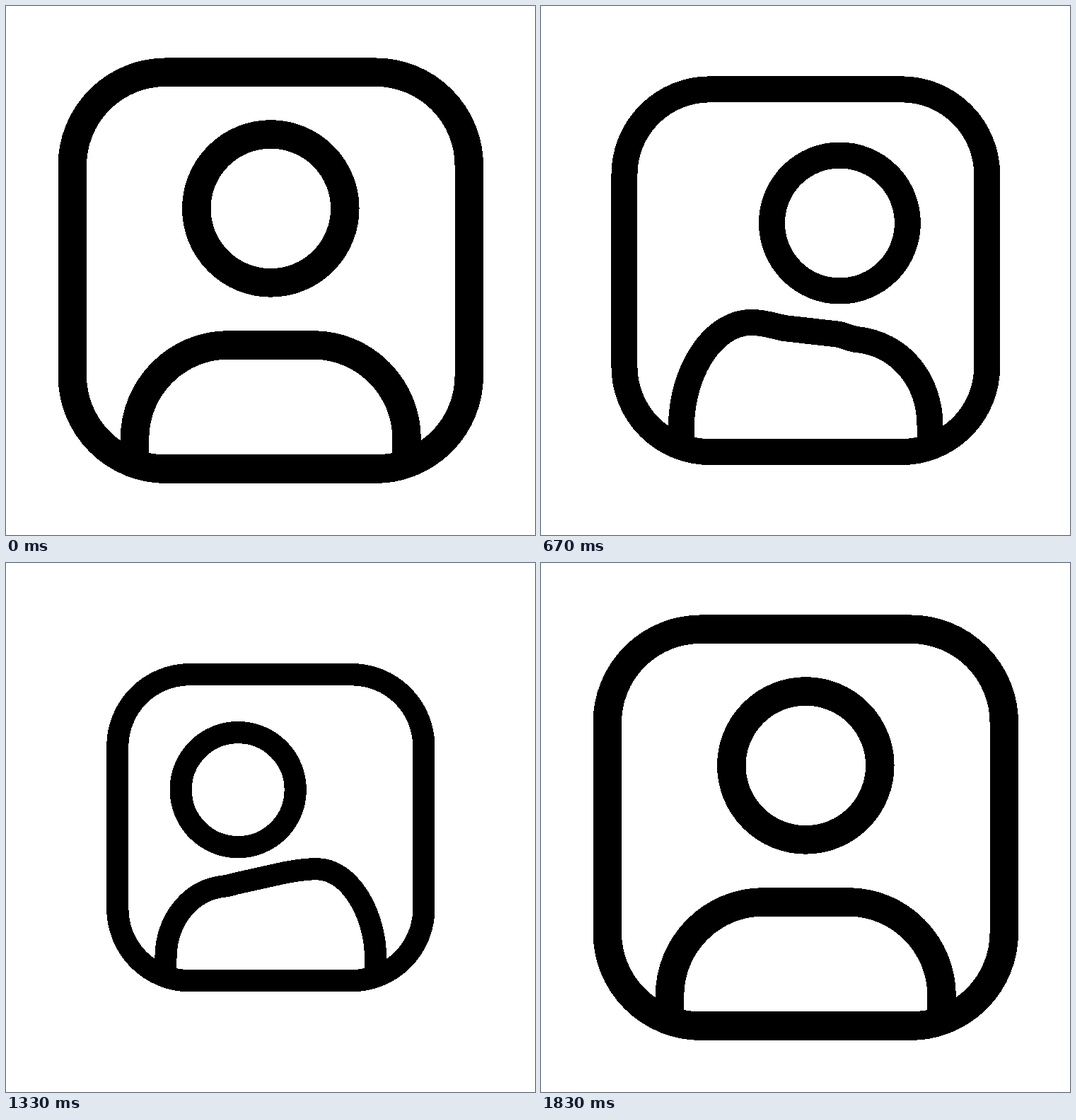
These frames come from a looping animation (748 px wide and 748 px high, 1.93 s). An HTML page without scripts:

```html
<!DOCTYPE html>
<html lang="en">
<head>
<meta charset="utf-8">
<title>Swaying profile icon</title>
<style>
  html, body { margin: 0; width: 100%; height: 100%; overflow: hidden; background: #fff; }
  svg { display: block; width: 100vw; height: 100vh; }
  .icon { fill: none; stroke: #000; stroke-width: 40.5; }
</style>
</head>
<body>
<!-- Phases: rest, lean right, lean left, return, rest -->
<svg viewBox="0 0 748 748" shape-rendering="crispEdges">
  <g transform="translate(374.3 374.2)">
    <g class="icon">
      <animateTransform attributeName="transform" type="scale" dur="1.93s" repeatCount="indefinite"
        calcMode="spline" keyTimes="0;.1865;.443;.7202;.9482;1"
        keySplines="0 0 1 1;.79 0 .195 1;.448 0 .198 1;.672 0 .1 1;0 0 1 1"
        values="1;1;.9;.771;1;1"/>

      <rect class="frame" x="-280.5" y="-280.5" width="561" height="561" rx="132"/>

      <circle class="head" cy="-87.8" r="105">
        <animateMotion dur="1.93s" repeatCount="indefinite"
          path="M0 0Q30.25 0 60.5 18.9Q0 -18.9 -60.5 18.9Q-30.25 0 0 0"
          calcMode="spline" keyTimes="0;.1865;.443;.7202;.9482;1"
          keySplines="0 0 1 1;.79 0 .195 1;.448 0 .198 1;.672 0 .1 1;0 0 1 1"
          keyPoints="0;0;.25;.75;1;1"/>
      </circle>

      <path class="shoulders" d="M-192.3 270V238C-192.3 165-133 105.2-60 105.2C-50 105.2-40 105.2-30 105.2L30 105.2C40 105.2 50 105.2 60 105.2C133 105.2 192.3 165 192.3 238V270">
        <animate attributeName="d" dur="1.93s" repeatCount="indefinite"
          calcMode="spline" keyTimes="0;.1865;.443;.7202;.9482;1"
          keySplines="0 0 1 1;.79 0 .195 1;.448 0 .198 1;.672 0 .1 1;0 0 1 1"
          values="M-192.3 270V238C-192.3 165-133 105.2-60 105.2C-50 105.2-40 105.2-30 105.2L30 105.2C40 105.2 50 105.2 60 105.2C133 105.2 192.3 165 192.3 238V270;
            M-192.3 270V238C-192.3 165-133 105.2-60 105.2C-50 105.2-40 105.2-30 105.2L30 105.2C40 105.2 50 105.2 60 105.2C133 105.2 192.3 165 192.3 238V270;
            M-192.3 270V241C-192.3 160-148 76-88 76C-65 76-50 83-33 86.5L51 97C62 98.5 68 104 80 106.5C150 114 192.3 172 192.3 241V270;
            M-192.3 270V241C-192.3 172-150 114-84 107.5C-74 106-70 104-62 102L27 82C45 79 62 75.5 84 75.5C146 75.5 192.3 160 192.3 241V270;
            M-192.3 270V238C-192.3 165-133 105.2-60 105.2C-50 105.2-40 105.2-30 105.2L30 105.2C40 105.2 50 105.2 60 105.2C133 105.2 192.3 165 192.3 238V270;
            M-192.3 270V238C-192.3 165-133 105.2-60 105.2C-50 105.2-40 105.2-30 105.2L30 105.2C40 105.2 50 105.2 60 105.2C133 105.2 192.3 165 192.3 238V270"/>
      </path>
    </g>
  </g>
</svg>
</body>
</html>
```
